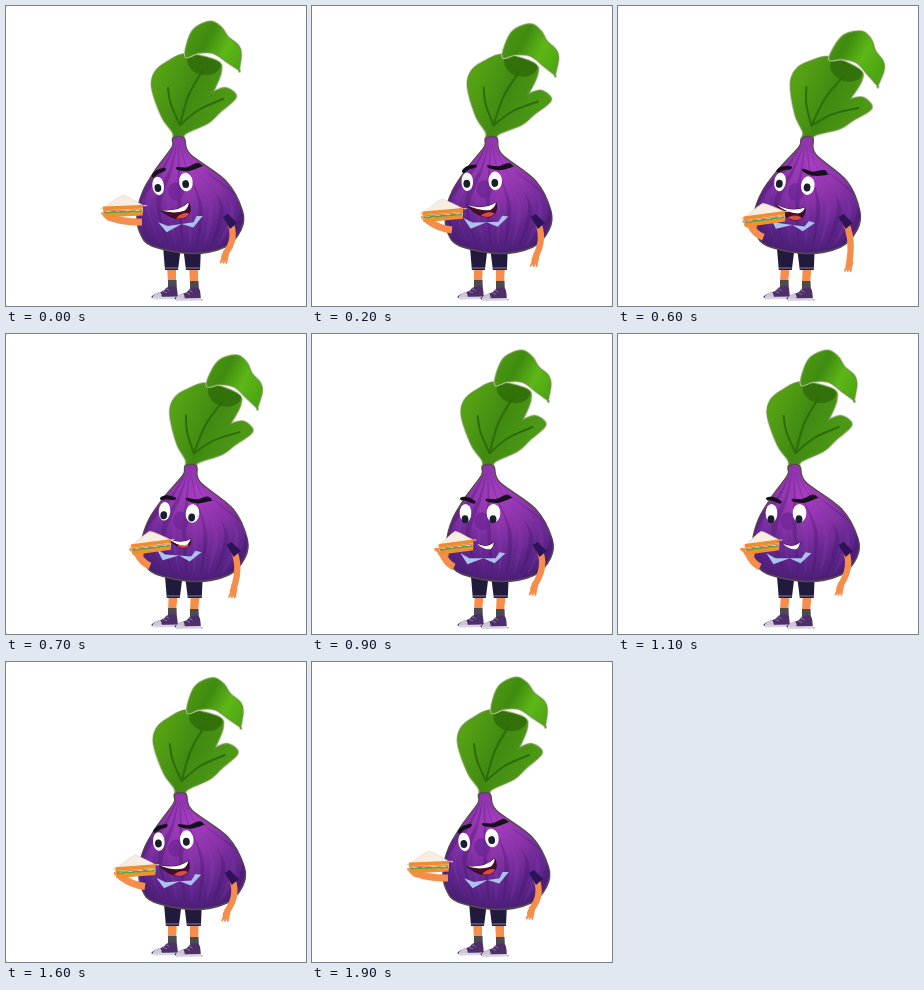
Animation, 300 px wide and 300 px high, one loop 2500 ms. Source, as an HTML page with a canvas:

```html
<!DOCTYPE html>
<html>
<head>
<meta charset="utf-8">
<style>
html, body { margin: 0; width: 100%; height: 100%; overflow: hidden; background: #fff; }
canvas { display: block; width: 300px; height: 300px; }
</style>
</head>
<body>
<canvas id="stage"></canvas>
<script>
const LOOP = 2500, STEP = 100, END = 1900;
const SKIN = '#f58d4c', COLLAR = '#a9c3ec', BROW = '#15101b';
const canvas = document.getElementById('stage');
const dpr = window.devicePixelRatio || 1;
canvas.width = canvas.height = 300 * dpr;
const c = canvas.getContext('2d');
const rad = Math.PI / 180;

const ramp = (t, a, b) => Math.max(0, Math.min(1, (t - a) / (b - a)));
const smooth = (t, a, b) => { const u = ramp(t, a, b); return u * u * (3 - 2 * u); };

// Four moves drive every part: lift the sandwich, lean in, bite, chew.
function poseAt(t) {
  const reach = smooth(t, 0, 400) - smooth(t, 1300, 1900);
  const sway = ramp(t, 0, 400) ** 2 - smooth(t, 500, 900);
  const bite = smooth(t, 650, 800) - smooth(t, 1400, 1600);
  const chew = smooth(t, 600, 800) - smooth(t, 1100, 1500);
  const hop = Math.sin(Math.PI * ramp(t, 0, 500));
  return {
    chew,
    leafRot: 12.5 * sway,
    foldRot: 2.5 * reach + 2 * sway,
    shift: 3.6 * reach,
    lean: 15 * sway ** 0.8,
    face: [166 + 1.5 * reach + 10 * sway, 178 + 1.2 * reach - 1.7 * sway - 3 * hop],
    faceRot: -8 + 8 * reach + 9 * sway,
    bread: [117 + 25 * reach + 5 * sway + 2 * bite, 202 + 8 * reach],
    breadRot: 4 - 4 * reach - 2 * sway,
    breadW: 1 + 0.05 * sway - 0.14 * bite,
    elbow: [136 + 6 * reach + 4 * sway, 216 + 17 * reach - 2 * sway],
    hand: [217 + 3 * reach + 11 * sway, 255 + 4 * reach + 5 * sway]
  };
}

const same = p => p;

// Smooth curve through points; a doubled point makes a corner.
function curve(points, map = same, closed = true) {
  const p = points.map(map), n = p.length;
  const at = i => closed ? p[(i + n) % n] : p[Math.max(0, Math.min(n - 1, i))];
  c.beginPath();
  c.moveTo(...p[0]);
  for (let i = 0; i < (closed ? n : n - 1); i++) {
    const a = at(i - 1), b = at(i), d = at(i + 1), e = at(i + 2);
    c.bezierCurveTo(b[0] + (d[0] - a[0]) / 6, b[1] + (d[1] - a[1]) / 6,
      d[0] - (e[0] - b[0]) / 6, d[1] - (e[1] - b[1]) / 6, d[0], d[1]);
  }
  if (closed) c.closePath();
}

function paint(fill, stroke, width = 1) {
  if (fill) { c.fillStyle = fill; c.fill(); }
  if (stroke) { c.strokeStyle = stroke; c.lineWidth = width; c.stroke(); }
}

function poly(points, color) {
  c.beginPath();
  points.forEach(p => c.lineTo(...p));
  c.closePath();
  paint(color);
}

function oval(x, y, rx, ry, color, rot = 0) {
  c.beginPath();
  c.ellipse(x, y, rx, ry, rot, 0, 7);
  paint(color);
}

function shade(g, ...colors) {
  colors.forEach((color, i) => g.addColorStop(i / (colors.length - 1), color));
  return g;
}

function placed([x, y], rot, draw) {
  c.save();
  c.translate(x, y);
  c.rotate(rot * rad);
  draw();
  c.restore();
}

function limb(from, via, to, width) {
  c.lineCap = 'butt';
  c.beginPath();
  c.moveTo(...from);
  c.quadraticCurveTo(...via, ...to);
  paint(null, SKIN, width);
}

function spin(cx, cy, deg) {
  const s = Math.sin(deg * rad), k = Math.cos(deg * rad);
  return ([x, y]) => [cx + (x - cx) * k - (y - cy) * s, cy + (x - cx) * s + (y - cy) * k];
}

const blade = [[167, 136], [167, 127], [156, 111], [146, 82], [149, 66], [161, 56],
  [180, 48], [211, 55], [215, 66], [207, 86], [207, 86], [220, 82],
  [230, 91], [214, 106], [202, 117], [179, 128], [178, 136]];
const fold = [[180, 51], [181, 38], [188, 23], [204, 15.5], [215, 21], [222, 31],
  [232, 39], [235, 48], [233, 64], [233, 64], [221, 56], [207, 47], [192, 47]];

function drawLeaf(p) {
  const dx = p.shift + p.lean;
  const turn = spin(172, 134, p.leafRot), bend = spin(182, 50, p.foldRot);
  const map = q => { const [x, y] = turn(q); return [x + dx, y]; };
  const mapFold = q => map(bend(q));
  const gx = dx + p.leafRot * 1.2;

  curve(blade, map);
  paint(null, '#b9c99f', 2.6);
  paint(shade(c.createLinearGradient(148 + gx, 75, 218 + gx, 105), '#55a313', '#418a12', '#4c9a14'),
    '#5f9430');
  c.save();
  c.clip();
  oval(...map([198, 56]), 17, 13, 'rgba(40,95,5,.6)', 0.2 + p.leafRot * rad);
  c.restore();
  c.lineCap = 'round';
  for (const [x, y] of [[162, 82], [197, 64], [217, 93]]) {
    curve([[174, 119], [(174 + x) / 2 - 3, (119 + y) / 2 - 2], [x, y]], map, false);
    paint(null, '#2c6d0b', 2);
  }
  curve(fold, mapFold);
  paint(null, '#b9c99f', 2.6);
  paint(shade(c.createLinearGradient(182 + gx, 25, 237 + gx, 55), '#4d9a12', '#3f8b10', '#5db716', '#4ca612'),
    '#5f9430');
}

const bulb = [[167, 132], [166, 141], [150, 163], [137, 185], [131, 208], [134, 227],
  [146, 240], [185, 247.5], [219, 241], [235, 224], [236.5, 205], [220, 175], [184, 148], [178, 132]];

function drawBody(p) {
  const map = ([x, y]) => [x + p.shift + p.lean * Math.max(0, (246 - y) / 113) ** 2, y];
  const [x, y] = map([183, 160]);
  curve(bulb, map);
  paint(shade(c.createRadialGradient(x, y, 4, x, y, 92), '#a53dbf', '#8a33a8', '#63278f', '#471d72'),
    '#5a4a4e', 1.4);
  c.save();
  c.clip();
  for (let i = -5; i <= 5; i++) {
    const mid = 184 + i * 10.5, low = 184 + i * 7;
    curve([[173 + i * 0.8, 138], [176 + i * 4, 162], [mid - 2.5, 196], [low, 240],
      [mid + 2, 202], [178 + i * 4, 164]], map);
    paint(i % 2 ? 'rgba(60,18,100,.3)' : 'rgba(150,60,185,.22)');
  }
  c.restore();
}

function drawShoe(x, y) {
  placed([x, y], 0, () => {
    curve([[0, 8], [2, 4], [10, 1], [15, -3], [23, -3], [25, 8], [25, 8]]);
    paint('#4e2f69');
    curve([[0, 8], [2, 4], [7, 2], [9, 7], [9, 7]]);
    paint('#cbc5d4');
    poly([[0, 7], [25, 6.5], [25, 9], [0, 9.5]], '#d9d5e0');
    c.beginPath();
    for (let i = 0; i < 2; i++) {
      c.moveTo(10 + i * 2.5, 1 - i * 2.5);
      c.lineTo(14 + i * 2.5, 3 - i * 2.5);
    }
    paint(null, '#9488a6', 0.8);
  });
}

function drawLegs(p) {
  const s = p.shift * 0.5;
  for (const [x, y] of [[162, 0], [184, 1]]) {
    poly([[x - 1 + s, 260], [x + 8 + s, 260], [x + 8, 277], [x, 277]], SKIN);
    poly([[x, 274 + y], [x + 8.5, 274 + y], [x + 9, 287], [x, 287]], '#4b4a4f');
    drawShoe(x - 15 + y, 284 + y * 1.5);
    const hip = x - 5 + s - y * 2;
    poly([[hip, 240], [hip + 18, 240], [hip + 15 + y * 2, 264], [hip + 2 + y, 264]], '#211a3d');
    c.beginPath();
    c.moveTo(hip + 2 + y, 262);
    c.lineTo(hip + 15 + y * 2, 262);
    paint(null, '#8b91b5', 0.9);
  }
}

function drawRightArm(p) {
  const x = 226 + p.shift, [hx, hy] = p.hand;
  limb([x - 3, 214], [x + 6, 232], [hx + 2, hy - 7], 6.3);
  oval(hx + 2, hy - 5, 3.6, 5.5, SKIN, 0.35);
  for (let i = 0; i < 3; i++) oval(hx - 1 + i * 2.3, hy - 1, 1.2, 4, SKIN, 0.5 - i * 0.2);
  poly([[x - 9, 211], [x - 4, 208], [x + 5, 217], [x - 2, 223]], '#2d1457');
}

function drawMouth(open) {
  const lip = 12 * open;
  const upper = () => { c.moveTo(-15, 0); c.quadraticCurveTo(2, 6, 14, -1); };
  c.beginPath();
  upper();
  c.bezierCurveTo(16, 8 * open, 11, lip + 1.5, 4, lip + 1);
  c.bezierCurveTo(-4, lip, -9, 7 * open, -15, 0);
  paint('#4a0d27', '#2d0b38', 1);
  c.save();
  c.clip();
  oval(5, 12 * open + 1, 8, 4.5, '#dc4a43', -0.2);
  c.restore();
  c.beginPath();
  upper();
  c.quadraticCurveTo(13, 4, 8, 6);
  c.quadraticCurveTo(-3, 7, -15, 0);
  paint('#fff');
}

function drawFace(p) {
  placed(p.face, p.faceRot, () => {
    const collarY = 41 + 4 * p.chew;
    poly([[-19, collarY - 5], [-12, collarY + 6], [4, collarY], [-10, collarY]], COLLAR);
    poly([[4, collarY], [15, collarY + 5], [26, collarY - 5], [20, collarY - 6], [16, collarY]], COLLAR);
    oval(3, 8, 8, 9, 'rgba(110,38,150,.75)');
    for (const x of [-14, 14]) {
      oval(x, 0, 6.3 + x / 28, 9.3, '#fff');
      oval(x - 0.5, 2 + 4 * p.chew, 3.4, 4, '#19202b');
    }
    placed([-12, -13], 38 * p.chew, () => {
      curve([[-7, 2], [-2, -2.5], [7, -4], [7, -1], [0, 1], [-5, 4]]);
      paint(BROW);
    });
    placed([19, -13], -8 * p.chew, () => {
      curve([[-12, -3], [-2, -1.5], [9, -4.5], [14, -0.5], [14, -0.5], [0, 2.5], [-11, 0]]);
      paint(BROW);
    });
    placed([6 * p.chew, 23 + 7 * p.chew], Math.min(0, p.faceRot) * 0.7, () => {
      c.scale(1 - 0.4 * p.chew, 1);
      drawMouth(1 - 0.75 * p.chew);
    });
  });
}

function drawSandwich(p) {
  const [x, y] = p.bread, [ex, ey] = p.elbow;
  const hx = x - 14, hy = y + 9;
  limb(p.elbow, [(ex + hx) / 2 - 2, (ey + hy) / 2 + 3], [hx, hy], 7);
  oval(hx + 1, hy, 6, 4, SKIN, 0.4);
  oval(hx - 4, hy - 3, 4, 2, SKIN, 0.3);
  const layer = (top, thick, color) => poly([[-20, top], [20, top - 4.5],
    [20, top - 4.5 + thick], [-20 + top * 0.2, top + thick]], color);
  placed(p.bread, p.breadRot, () => {
    c.scale(p.breadW, 1);
    curve([[-19, 1], [-19, 1], [-4, -11], [2, -12], [20, -4], [20, -4]]);
    paint('#f7ede0', '#dcc8b0', 0.5);
    layer(3, 5, '#f8e6bb');
    layer(0, 3.7, '#ef8d2e');
    const lettuce = Array.from({ length: 9 }, (_, i) => [-19 + i * 4.8, 5.6 - i * 0.5 + (i % 2) * 0.9]);
    curve(lettuce, same, false);
    paint(null, '#5fa13a', 2.2);
    layer(4, 0.9, '#dc7765');
    layer(7, 3.7, '#f1902f');
  });
}

function draw(t) {
  const p = poseAt(t);
  c.setTransform(dpr, 0, 0, dpr, 0, 0);
  c.fillStyle = '#fff';
  c.fillRect(0, 0, 300, 300);
  c.lineJoin = 'round';
  drawLegs(p);
  drawLeaf(p);
  drawBody(p);
  drawRightArm(p);
  drawFace(p);
  drawSandwich(p);
}

function tick() {
  const t = performance.now() % LOOP;
  draw(Math.min(END, Math.floor(t / STEP) * STEP));
  requestAnimationFrame(tick);
}
tick();
</script>
</body>
</html>
```
